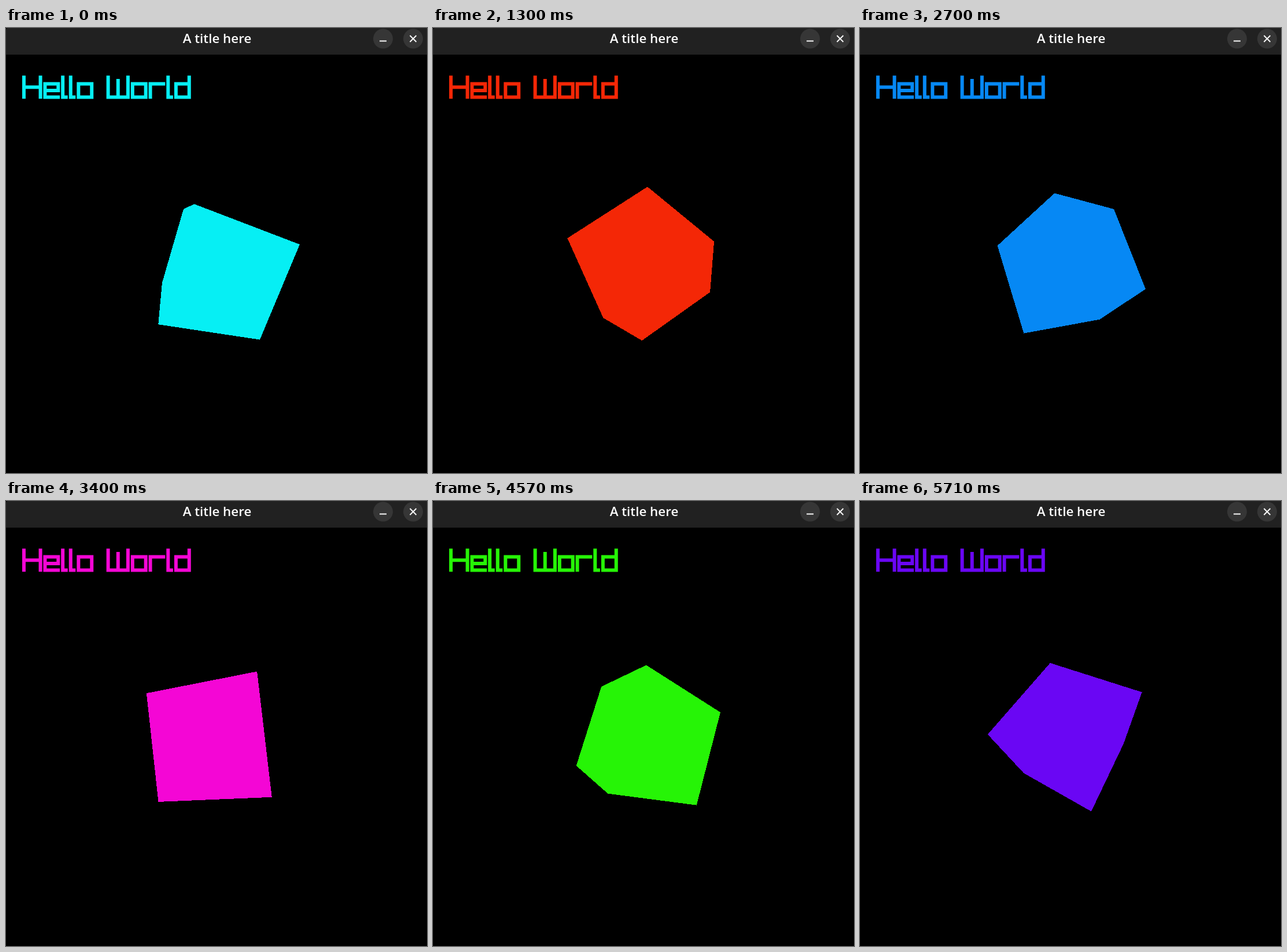
An HTML page that plays this animation: 728x769 px, repeating every 5.74 s.

```html
<!DOCTYPE html>
<html lang="en">
<head>
<meta charset="utf-8">
<title>A title here</title>
<style>
  html, body { margin: 0; width: 100%; height: 100%; overflow: hidden; background: #000; }
  svg { display: block; }
  .title { font: 600 22.4px "Open Sans", "Noto Sans", sans-serif; fill: #fafafa; text-anchor: middle; }
</style>
</head>
<body>
<svg width="728" height="769" viewBox="0 0 728 769">
  <rect width="728" height="769"/>
  <path d="M0 46V4Q0 0 4 0H728V46Z" fill="#212121"/>
  <text class="title" x="365" y="25.5">A title here</text>
  <g fill="#363636">
    <circle cx="652" cy="18.5" r="17"/>
    <circle cx="704" cy="18.5" r="17"/>
  </g>
  <path d="M646 22.5H658M698.5 13L709.5 24M709.5 13L698.5 24" stroke="#fafafa" stroke-width="2"/>
  <g id="label" role="img" aria-label="Hello World" fill="none" stroke-width="1.05"></g>
  <polygon id="cube" shape-rendering="crispEdges"/>
</svg>
<script>
const LOOP = 5740;

// time in ms, rotation in degrees, unwrapped hue in degrees
const STEPS = [
  [0, 15.2, 181],
  [670, 28.8, 280],
  [1900, 53.7, 452],
  [2700, 69.5, 567],
  [4140, 98.1, 774],
  [5070, 116.9, 899],
  [5710, 128.8, 985],
  [5740, 129.4, 989]
];

// block letters: width in cells and centre lines of the strokes
const GLYPHS = {
  H: [6, "M.5 0V7M5.5 0V7M1 3.5H5"],
  e: [5, "M.5 4.5H4.5V2.5H.5V6.5H5"],
  l: [2, "M.5 0V6.5H2"],
  o: [5, "M.5 2.5H4.5V6.5H.5Z"],
  W: [7, "M.5 0V6.5H6.5V0M3.5 1V6.5"],
  r: [5, "M.5 7V2.5H5"],
  d: [5, "M4.5 0V6.5H.5V2.5H4.5"]
};
const CELL = 5.72, GAP = 2.15, SPACE = 20.5;

const CENTER = [365.9, 413.7];
const FOCAL = 313.6, DISTANCE = 2.349;
const HALF = 1 / Math.sqrt(3);

const label = document.getElementById("label");
const cube = document.getElementById("cube");

function layLabel(text, x, y) {
  for (const ch of text) {
    if (ch === " ") { x += SPACE; continue; }
    const [cells, d] = GLYPHS[ch];
    const path = document.createElementNS("http://www.w3.org/2000/svg", "path");
    path.setAttribute("d", d);
    path.setAttribute("transform", `translate(${x} ${y}) scale(${CELL})`);
    label.append(path);
    x += cells * CELL + GAP;
  }
}

function sample(time) {
  let i = 1;
  while (i < STEPS.length - 1 && time > STEPS[i][0]) i++;
  const a = STEPS[i - 1], b = STEPS[i];
  const k = (time - a[0]) / (b[0] - a[0]);
  return [1, 2].map(n => a[n] + (b[n] - a[n]) * k);
}

// turn by the same angle about z, then x, then y, and project
function project([x, y, z], angle) {
  const c = Math.cos(angle), s = Math.sin(angle);
  [x, y] = [x * c - y * s, x * s + y * c];
  [y, z] = [y * c + z * s, z * c - y * s];
  [x, z] = [x * c + z * s, z * c - x * s];
  const scale = FOCAL / (DISTANCE - z);
  return [CENTER[0] + x * scale, CENTER[1] + y * scale];
}

function halfHull(points) {
  const out = [];
  for (const p of points) {
    while (out.length > 1) {
      const [a, b] = out.slice(-2);
      if ((b[0] - a[0]) * (p[1] - a[1]) - (b[1] - a[1]) * (p[0] - a[0]) > 0) break;
      out.pop();
    }
    out.push(p);
  }
  return out.slice(0, -1);
}

function outline(points) {
  points.sort((a, b) => a[0] - b[0] || a[1] - b[1]);
  return [...halfHull(points), ...halfHull(points.reverse())];
}

const corners = [...Array(8).keys()].map(i => [1, 2, 4].map(bit => i & bit ? HALF : -HALF));

function draw(time) {
  const [degrees, hue] = sample(time);
  const angle = degrees * Math.PI / 180;
  const points = outline(corners.map(p => project(p, angle)));
  const color = `hsl(${hue % 360} 95% 49%)`;
  cube.setAttribute("points", points.map(p => p.map(v => v.toFixed(2)).join()).join(" "));
  cube.setAttribute("fill", color);
  label.setAttribute("stroke", color);
}

const start = performance.now();
function tick() {
  draw((performance.now() - start) % LOOP);
  requestAnimationFrame(tick);
}

layLabel("Hello World", 28.1, 82.3);
tick();
</script>
</body>
</html>
```
